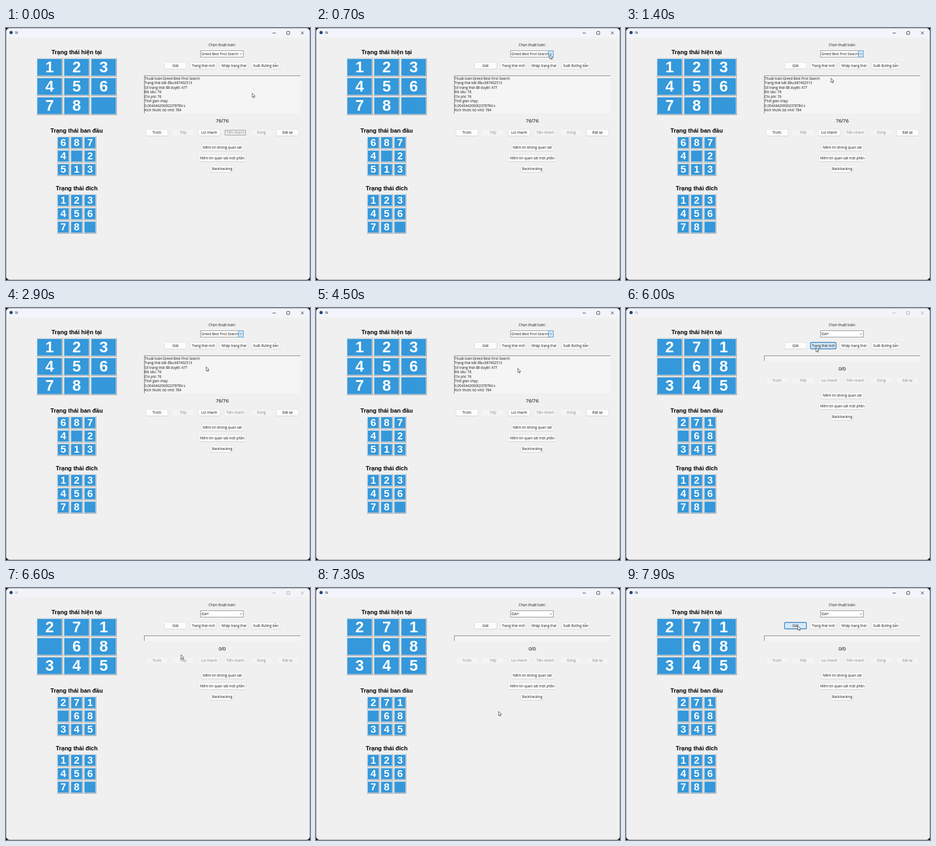
An HTML page with a canvas for the animation above (8 s loop, 568 by 472 pixels).

```html
<!DOCTYPE html>
<html lang="vi">
<head>
<meta charset="utf-8">
<title>tk</title>
<style>
html, body { margin: 0; width: 100%; height: 100%; overflow: hidden; background: #000; }
canvas { display: block; }
</style>
</head>
<body>
<canvas id="stage" width="568" height="472"></canvas>
<script>
const ctx = document.getElementById('stage').getContext('2d');
const LOOP = 8000, STEP = 100;
const UI = '"Open Sans", "Noto Sans", sans-serif';
const ARIAL = '"Liberation Sans", Arial, sans-serif';
const UI_SIZE = 6.4, LEFT = 132, RIGHT = 404;

// Moments at which the interface changes
const OPEN_LIST = 700, PICK = 4700, NEW_STATE = 5900, DIALOG_CLOSED = 7200, HOVER_SOLVE = 7800;

const LOG = [
  'Thuật toán:Greed Best First Search',
  'Trạng thái bắt đầu:687402513',
  'Số trạng thái đã duyệt: 477',
  'Độ sâu: 76',
  'Chi phí: 76',
  'Thời gian chạy:',
  '0.004344200002378784 s',
  'Kích thước bộ nhớ: 784'
];

// Places where the pointer slows down
const STOPS = [
  { t: 0, x: 460, y: 122 },
  { t: OPEN_LIST, x: 437, y: 50 },
  { t: 1400, x: 383, y: 94 },
  { t: 2300, x: 374, y: 110 },
  { t: 4800, x: 377, y: 113 },
  { t: 5200, x: 301, y: 106 },
  { t: NEW_STATE, x: 357, y: 71 },
  { t: 6600, x: 327, y: 125 },
  { t: 7100, x: 345, y: 261 },
  { t: 7900, x: 321, y: 71 }
];

const ease = k => k * k * (3 - 2 * k);

function pointerAt(t) {
  const next = STOPS.findIndex(s => s.t > t);
  if (next < 0) return STOPS[STOPS.length - 1];
  const a = STOPS[next - 1], b = STOPS[next];
  const k = ease((t - a.t) / (b.t - a.t));
  return { x: Math.round(a.x + (b.x - a.x) * k), y: Math.round(a.y + (b.y - a.y) * k) };
}

function rect(x, y, w, h, color) {
  ctx.fillStyle = color;
  ctx.fillRect(x, y, w, h);
}

function rounded(x, y, w, h, r, fill, stroke, width = 1) {
  ctx.beginPath();
  ctx.roundRect(x, y, w, h, r);
  if (fill) { ctx.fillStyle = fill; ctx.fill(); }
  if (stroke) { ctx.strokeStyle = stroke; ctx.lineWidth = width; ctx.stroke(); }
}

function line(points, color, width = 0.8) {
  ctx.beginPath();
  points.forEach(([x, y]) => ctx.lineTo(x, y));
  ctx.strokeStyle = color;
  ctx.lineWidth = width;
  ctx.stroke();
}

// y is the middle of the capital letters
function text(str, x, y, { size = UI_SIZE, family = UI, weight = 400, color = '#111', align = 'center' } = {}) {
  ctx.font = `${weight} ${size}px ${family}`;
  ctx.textAlign = align;
  ctx.fillStyle = color;
  ctx.fillText(str, x, y + size * 0.36);
}

function windowFrame(active) {
  const ink = active ? '#111' : '#9a9a9a';
  rect(0, 0, 568, 472, '#000');
  rounded(0.5, 0.5, 567, 471, 6, '#f0f0f0');
  rounded(0.5, 0.5, 567, 17, [6, 6, 0, 0], active ? '#f2f5fb' : '#f3f4f8');
  rounded(0.5, 0.5, 567, 471, 6, null, '#a8a8a8');
  rounded(6.5, 5.5, 6, 6, 3, '#24427a');
  text('tk', 17, 9, { align: 'left', color: ink });
  line([[498, 9.5], [504, 9.5]], ink);
  rounded(524.5, 6.5, 5.5, 5.5, 1, null, ink, 0.8);
  line([[551, 6.5], [556.5, 12]], ink);
  line([[556.5, 6.5], [551, 12]], ink);
}

function tile(digit, x, y, w, h, size) {
  rect(x, y, w, h, '#959595');
  rect(x, y, w - 1, h - 1, '#ececec');
  rect(x + 1.4, y + 1.4, w - 3.2, h - 3.2, '#3498db');
  if (digit !== '0') text(digit, x + w / 2, y + h / 2 - 0.8, { size, family: ARIAL, weight: 700, color: '#fff' });
}

function board(title, digits, y, w, h, size) {
  const gap = 1.5, x = LEFT - 1.5 * w - gap;
  text(title, LEFT, y - 11.3, { size: 11, family: ARIAL, weight: 700, color: '#000' });
  [...digits].forEach((d, i) =>
    tile(d, x + (i % 3) * (w + gap), y + Math.floor(i / 3) * (h + gap), w, h, size));
}

function button(label, x, cy, w, { off, hot, focus }) {
  const y = cy - 6;
  if (!off) rounded(x, y + 0.7, w, 12, 2, '#cccccc');
  rounded(x, y, w, 12, 2, hot ? '#d8e9f7' : off ? '#f5f4f4' : '#fdfdfd',
    hot ? '#2f7fc0' : off ? '#eaeaea' : '#dcdcdc', hot ? 1.3 : 0.7);
  if (focus) rounded(x + 1.5, y + 1.5, w - 3, 9, 0, null, '#777', 0.8);
  text(label, x + w / 2, cy, { color: off ? '#858585' : '#111' });
}

// Buttons sized by their labels, centred as a group
function buttonRow(labels, cy, { gap = 7.5, minWidth = 41, state = () => ({}) } = {}) {
  ctx.font = `${UI_SIZE}px ${UI}`;
  const widths = labels.map(s => Math.max(minWidth, ctx.measureText(s).width + 5));
  let x = RIGHT - (widths.reduce((a, b) => a + b) + gap * (labels.length - 1)) / 2;
  labels.forEach((label, i) => {
    button(label, x, cy, widths[i], state(label));
    x += widths[i] + gap;
  });
}

function combo(label, selected, open) {
  rect(363, 42, 81, 13, '#909090');
  rect(364, 43, 79, 11, '#fff');
  if (selected) rect(365, 44, 68, 9.5, '#0078d7');
  if (open) {
    rect(434, 42, 10, 13, '#4a9bd4');
    rect(435, 43, 8, 11, '#cfe6f7');
  }
  line([[437, 47.5], [439, 49.5], [441, 47.5]], '#444');
  text(label, 365, 48.5, { align: 'left', color: selected ? '#fff' : '#111' });
}

function logBox(lines) {
  const h = lines.length ? 71 : 10;
  rect(258, 89, 292, h, '#f5f5f5');
  rect(258, 89, 292, 1, '#808080');
  rect(258, 89, 1, h, '#808080');
  lines.forEach((s, i) => text(s, 259, 94.5 + i * 8.52, { align: 'left' }));
}

function controls(t) {
  const solved = t < PICK, top = solved ? 160 : 100;
  text('Chọn thuật toán:', RIGHT, 32);
  combo(solved ? 'Greed Best First Search' : 'IDA*',
    t >= PICK && t < NEW_STATE, t >= OPEN_LIST && solved);

  const hot = t >= HOVER_SOLVE ? 'Giải' : t >= 5800 && t < 6100 ? 'Trạng thái mới' : '';
  buttonRow(['Giải', 'Trạng thái mới', 'Nhập trạng thái', 'Xuất đường dẫn'], 70.5,
    { state: label => ({ hot: label === hot }) });

  logBox(solved ? LOG : []);
  text(solved ? '76/76' : '0/0', RIGHT, top + 14, { size: 9.7, family: ARIAL });

  const usable = solved ? ['Trước', 'Lùi nhanh', 'Đặt lại'] : [];
  buttonRow(['Trước', 'Tiếp', 'Lùi nhanh', 'Tiến nhanh', 'Dừng', 'Đặt lại'], top + 36, {
    gap: 7.8,
    state: label => ({
      off: !usable.includes(label),
      focus: label === 'Tiến nhanh' && t < OPEN_LIST
    })
  });

  ['Niềm tin không quan sát', 'Niềm tin quan sát một phần', 'Backtracking']
    .forEach((label, i) => buttonRow([label], top + 64 + i * 20));
}

function pointer({ x, y }) {
  ctx.beginPath();
  [[0, 0], [0, 8], [1.8, 6.4], [3, 9], [4.3, 8.4], [3.1, 5.9], [5.6, 5.7]]
    .forEach(([px, py]) => ctx.lineTo(x + px, y + py));
  ctx.closePath();
  ctx.fillStyle = '#f6f6f6';
  ctx.fill();
  ctx.strokeStyle = '#3a3a3a';
  ctx.lineWidth = 0.8;
  ctx.stroke();
}

function draw(t) {
  const goal = '123456780', fresh = t >= NEW_STATE && '271068345';
  windowFrame(t < NEW_STATE || t >= DIALOG_CLOSED);
  board('Trạng thái hiện tại', fresh || goal, 56.5, 49, 34.5, 28.8);
  board('Trạng thái ban đầu', fresh || '687402513', 203, 23.5, 23.7, 19);
  board('Trạng thái đích', goal, 311, 23.5, 23.7, 19);
  controls(t);
  pointer(pointerAt(t));
}

function tick() {
  const t = performance.now() % LOOP;
  draw(Math.floor(t / STEP) * STEP);
  requestAnimationFrame(tick);
}
tick();
</script>
</body>
</html>
```
